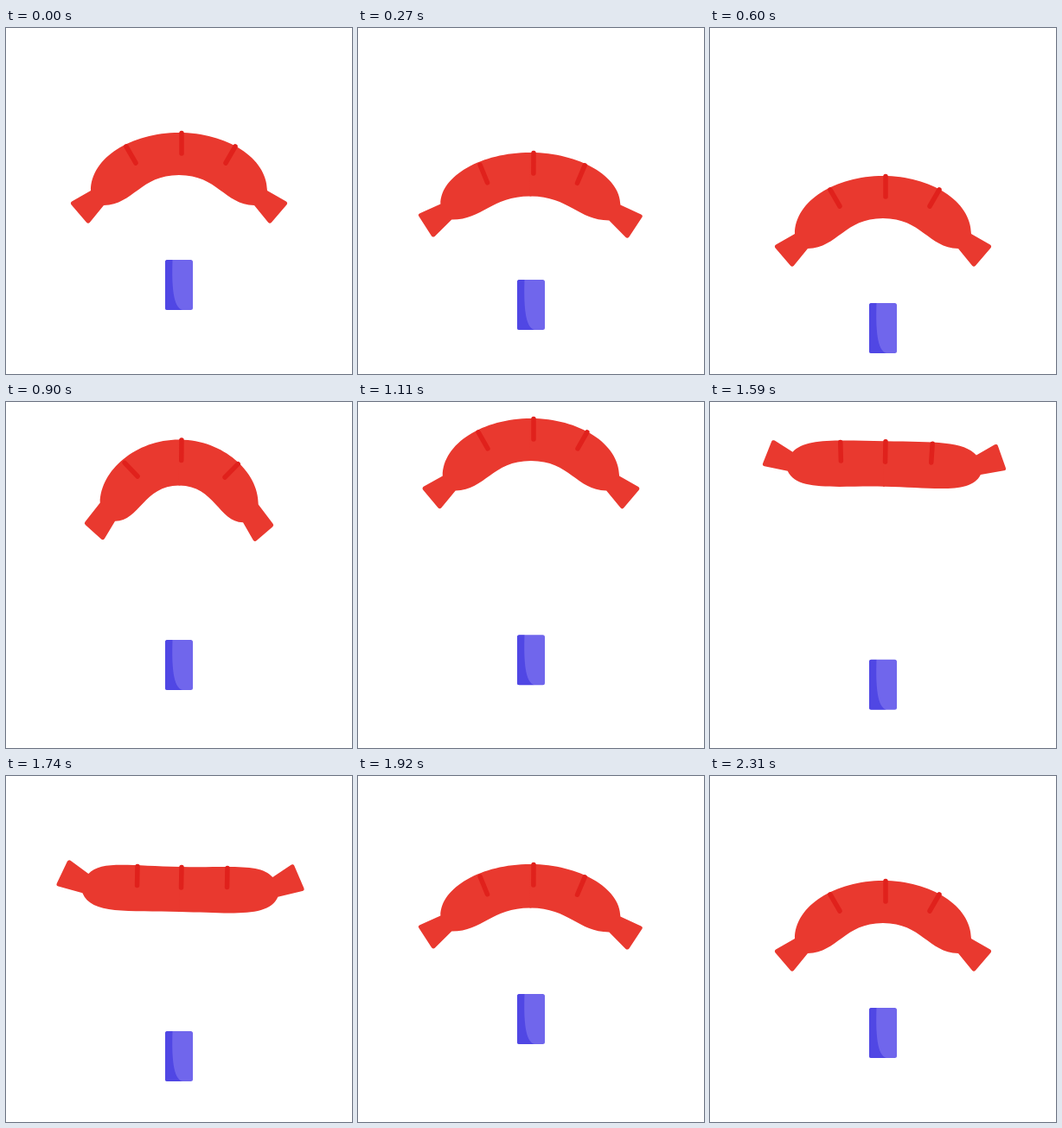
Write an HTML page with a canvas that moves like this. It is 400 by 400 pixels and loops after 4340 ms.

```html
<!DOCTYPE html>
<html lang="en">
<head>
<meta charset="utf-8">
<title>Bouncing sausage</title>
<style>
html, body { margin: 0; width: 100%; height: 100%; overflow: hidden; background: #fff; }
canvas { display: block; width: 400px; height: 400px; }
</style>
</head>
<body>
<canvas id="stage" width="400" height="400"></canvas>
<script>
const ctx = document.getElementById('stage').getContext('2d');
const LOOP = 4340, REST = 2310, STEP = 30;

// Half outlines, measured from the middle of the upper edge, tightest bend first:
// top handles, end, tail corners, neck, lower handles, middle, tick, centre x, tilt
const poses = [
  [50, 91.5, 36, 91.5, 74, 110, 98, 87.5, 118, 74, 95, 46, 95, 41, 53, 65.5, 27.5, 50.5, 43, 201, 0.01],
  [55, 102, 29, 102, 67, 126.5, 81, 105, 106, 87, 84, 52, 83, 45, 49, 63, 16, 52, 35, 200, 0],
  [56, 104, 27, 104, 60, 130.5, 72, 112.5, 99.5, 91, 78, 55, 78, 45, 50.5, 60.5, 14.5, 52, 35, 199.7, 0.005],
  [50, 92, 16, 105, 32, 129, 27, 131, 57, 106, 53.5, 90, 73, 50, 55, 58, 9, 53, 29, 202, 0.015],
  [60, 92, -6, 106.5, 10, 130, -6.5, 144, 24.5, 113, 32.5, 103, 57, 60, 52, 52, 0.5, 52, 22.5, 202, 0.019]
];

const topY = [[0, 121], [570, 171], [600, 171], [760, 105], [900, 43.5], [1080, 20], [1210, 17],
  [1380, 21], [1650, 57], [1740, 105], [1805, 120], [1920, 102], [1960, 100], [2290, 121]];
const blockY = [[0, 268], [570, 318], [600, 318], [760, 296], [900, 275], [1030, 267],
  [1380, 289], [1680, 299], [1740, 295], [1920, 252], [1960, 250], [2290, 268]];
const bend = [[0, 1], [270, 2], [560, 1], [610, 1], [900, 0], [1100, 1], [1380, 3],
  [1640, 3.9], [1740, 4], [1920, 2], [2040, 1.1], [2180, 1.3], [2310, 1]];

// Monotone cubic through the keys
function track(keys, t) {
  const last = keys.length - 1;
  if (t >= keys[last][0]) return keys[last][1];
  const rise = i => (keys[i + 1][1] - keys[i][1]) / (keys[i + 1][0] - keys[i][0]);
  const slope = i => {
    if (i === 0 || i === last) return 0;
    const a = rise(i - 1), b = rise(i);
    return a * b > 0 ? 2 * a * b / (a + b) : 0;
  };
  let i = 0;
  while (t >= keys[i + 1][0]) i++;
  const span = keys[i + 1][0] - keys[i][0];
  const s = (t - keys[i][0]) / span, r = 1 - s;
  return keys[i][1] * r * r * (1 + 2 * s) + keys[i + 1][1] * s * s * (3 - 2 * s)
    + span * s * r * (slope(i) * r - slope(i + 1) * s);
}

function poseAt(b) {
  const i = Math.min(Math.floor(b), poses.length - 2);
  return poses[i].map((v, k) => v + (poses[i + 1][k] - v) * (b - i));
}

function line(x1, y1, x2, y2) {
  ctx.beginPath();
  ctx.moveTo(x1, y1);
  ctx.lineTo(x2, y2);
  ctx.stroke();
}

function half(p, side) {
  const [c1, c2, c2y, ex, ey, ax, ay, bx, by, nx, ny, d2, d2y, d1, my] = p;
  ctx.save();
  ctx.scale(side, 1);
  ctx.beginPath();
  ctx.moveTo(-1, 0);
  ctx.lineTo(0, 0);
  ctx.bezierCurveTo(c1, 0, c2, c2y, ex, ey);
  ctx.arcTo(ax, ay, bx, by, 2.5);
  ctx.arcTo(bx, by, nx, ny, 2.5);
  ctx.lineTo(nx, ny);
  ctx.bezierCurveTo(d2, d2y, d1, my, 0, my);
  ctx.lineTo(-1, my);
  ctx.fill();
  ctx.restore();
}

function sausage(y, p) {
  const [tx, ty, ux, uy, cx, tilt] = p.slice(15);
  ctx.save();
  ctx.translate(cx, y);
  ctx.rotate(tilt);
  ctx.fillStyle = '#e9392f';
  half(p, -1);
  half(p, 1);
  ctx.strokeStyle = '#e0211c';
  ctx.lineWidth = 5.5;
  ctx.lineCap = 'round';
  line(2 - tx, ty, 2 - ux, uy);
  line(203 - cx, 0.5, 203 - cx, 24);
  line(2 + tx, ty, 2 + ux, uy);
  ctx.restore();
}

function block(y) {
  ctx.save();
  ctx.translate(184, y);
  ctx.beginPath();
  ctx.roundRect(0, 0, 32, 58, 2.5);
  ctx.fillStyle = '#7066ec';
  ctx.fill();
  ctx.clip();
  ctx.beginPath();
  ctx.moveTo(0, 0);
  ctx.lineTo(8.5, 0);
  ctx.bezierCurveTo(7.5, 32, 9.5, 55, 20, 58);
  ctx.lineTo(0, 58);
  ctx.fillStyle = '#5047e4';
  ctx.fill();
  ctx.restore();
}

function draw(now) {
  const t = Math.min(Math.floor(now % LOOP / STEP) * STEP, REST);
  ctx.fillStyle = '#fff';
  ctx.fillRect(0, 0, 400, 400);
  block(track(blockY, t));
  sausage(track(topY, t), poseAt(track(bend, t)));
}

const start = performance.now();
function frame() {
  draw(performance.now() - start);
  requestAnimationFrame(frame);
}
frame();
</script>
</body>
</html>
```
